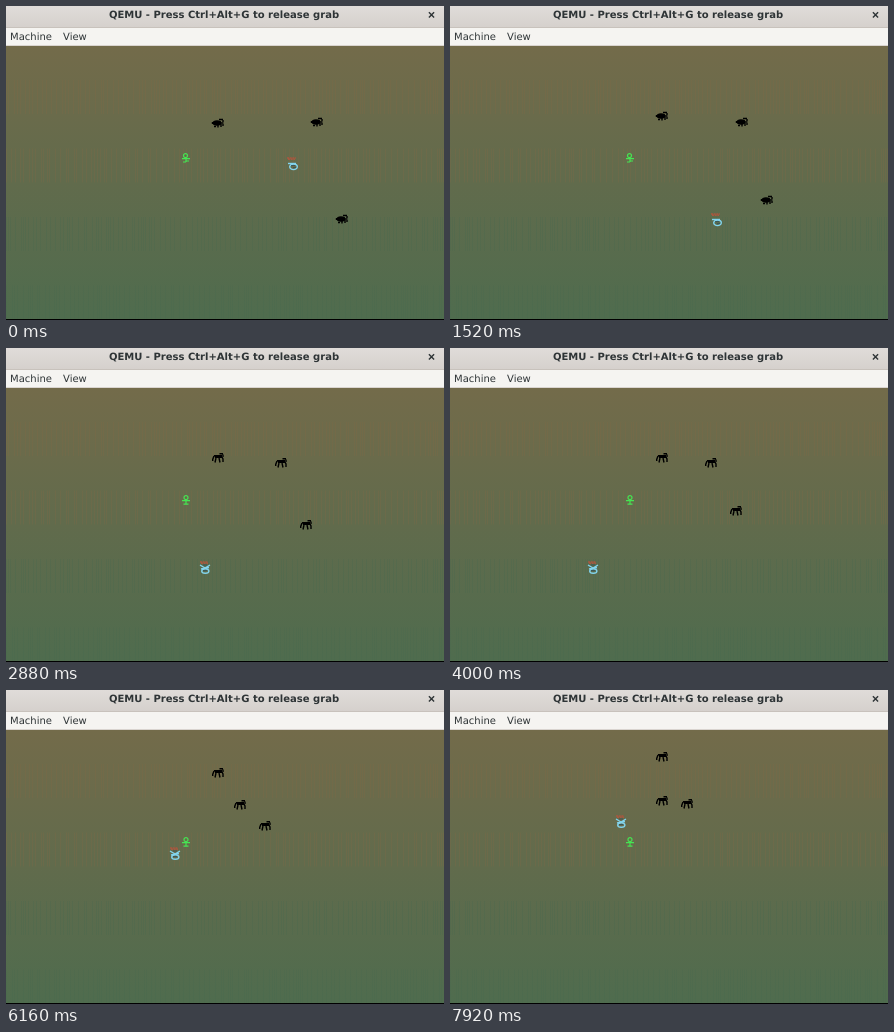
An HTML page that plays this animation: 438 by 314 pixels, repeating every 8000 ms.

```html
<!DOCTYPE html>
<html lang="en">
<head>
<meta charset="utf-8">
<title>QEMU</title>
<style>
  html, body { margin: 0; width: 100%; height: 100%; overflow: hidden; background: #000; }
  svg { display: block; width: 438px; height: 314px; }
  text { font: 10.03px "DejaVu Sans", sans-serif; fill: #2e3436; text-rendering: geometricPrecision; }
  .title { font-weight: bold; text-anchor: middle; }
  .line { fill: none; stroke-width: 1.4; }
  .spider { stroke: #000; }
  .plant { stroke: #45e552; stroke-width: 1.2; }
  .hat { stroke: #a8583f; stroke-dasharray: 2 .7; }
  .body { stroke: #82d4ee; }
  .dark { stroke: #34525a; stroke-width: .8; }
</style>
</head>
<body>
<svg viewBox="0 0 438 314" xmlns="http://www.w3.org/2000/svg">
  <defs>
    <linearGradient id="bar" x2="0" y2="1">
      <stop stop-color="#e0dcd9"/><stop offset="1" stop-color="#d5d0cc"/>
    </linearGradient>
    <linearGradient id="field" x2="0" y2="1">
      <stop stop-color="#736b4a"/><stop offset=".5" stop-color="#616b4c"/><stop offset="1" stop-color="#4f6c4e"/>
    </linearGradient>

    <g id="spider0" class="line spider">
      <ellipse cx="-1" rx="3.6" ry="2" fill="#000"/>
      <path d="M1 -3.5H5M2 -2V0M3 0H5.5M5 -3V-1M-5.5 -1V1M-4 3.5H-2M0 2V4.5M3 1V4M5 1V3"/>
    </g>
    <g id="spider1" class="line spider">
      <path d="M-4 -2.2H4M-3 -.8H4M1.5 -4.3H5M5 -3.5V-1M-4 -2L-5.3 1.5V3M-2 0L-3 4.5M1 0L2 4.5M4 -1L5 1V4"/>
    </g>
    <g id="plant0" class="line plant">
      <circle cx="-.5" cy="-2.3" r="2"/>
      <path d="M-4 .6H4M0 0V4M-3 4H0M0 3H3"/>
    </g>
    <g id="plant1" class="line plant">
      <circle cy="-2.3" r="2"/>
      <path d="M-4 .6H4M0 0V4M-2.5 4.2H2.5"/>
    </g>
    <g id="hero0" class="line">
      <path class="hat" d="M-6 -8H3M-5 -6.7H2"/>
      <path class="body" d="M-5 -2.5H3"/>
      <ellipse class="body" cx=".5" cy=".8" rx="3.8" ry="2.8"/>
      <path class="dark" d="M-2 -.5H2M0 1.5H3"/>
    </g>
    <g id="hero1" class="line">
      <path class="hat" d="M-5 -6H3M-4 -4.7H3"/>
      <path class="body" d="M-5 -3L0 0L5 -3M-4 1L4 -.5"/>
      <ellipse class="body" cx=".3" cy="3" rx="3.6" ry="2.3"/>
      <path class="dark" d="M-2 -3H2M-2 2.5H2"/>
    </g>
  </defs>

  <rect width="438" height="22" fill="url(#bar)"/>
  <rect y="21" width="438" height="1" fill="#c8c2bc"/>
  <rect y="22" width="438" height="18" fill="#f5f4f1"/>
  <rect y="39.3" width="438" height=".7" fill="#cdc7c2"/>
  <rect y="40" width="438" height="273" fill="url(#field)"/>
  <g id="weave"></g>
  <rect y="313" width="438" height="1"/>
  <text class="title" x="218" y="12.3">QEMU - Press Ctrl+Alt+G to release grab</text>
  <path d="M422.9 6.2L428.1 11.4M428.1 6.2L422.9 11.4" stroke="#2e3436" stroke-width="1.4"/>
  <text x="4" y="34.4">Machine</text>
  <text x="57" y="34.4">View</text>
  <g id="stage"></g>
</svg>
<script>
const STEP = 80, STEPS = 100;
const FLIP = 10.2, LEAD = 1.5;   // pose change, in steps
const STRIDE = 4;                // hero pixels per step

// Steps of [from, to] that have passed by step n.
const held = (n, from, to) => Math.max(0, Math.min(n, to) - from);

function hero(n) {
  const left = held(n, 0, 5) + held(n, 19, 57.5) + held(n, 80, 89);
  const right = held(n, 63, 77) + held(n, 89.5, STEPS);
  const down = held(n, 5, 20) + held(n, 77, 84);
  const up = held(n, 50, 64) + held(n, 84, STEPS);
  return [287 + STRIDE * (right - left), 160 + STRIDE * (down - up)];
}

const actors = [
  { kind: "spider", at: n => [212, 117 - held(n, 0, 7) - held(n, 50, 95) + held(n, 97, STEPS)] },
  { kind: "spider", at: n => [311 - n, 116 - held(n, 30, 31) - held(n, 95, STEPS)] },
  { kind: "spider", at: n => [336 - n, 213 - n] },
  { kind: "plant", at: () => [180, 152] },
  { kind: "hero", at: hero }
];

function add(parent, tag, attrs = {}) {
  const node = document.createElementNS(parent.namespaceURI, tag);
  for (const key in attrs) node.setAttribute(key, attrs[key]);
  parent.append(node);
  return node;
}

// Faint vertical threads in every second band of the field.
let seed = 7;
const random = () => (seed = seed * 16807 % 2147483647) / 2147483647;
const weave = document.getElementById("weave");
for (let band = 0; band < 4; band++) {
  let d = "";
  for (let x = 0; x < 438; x += 2 + Math.floor(random() * 5)) d += `M${x + .5} ${74 + band * 68.5}v34`;
  add(weave, "path", { d, stroke: band < 2 ? "#806a48" : "#496a50", "stroke-opacity": .3 });
}

const stage = document.getElementById("stage");
for (const a of actors) a.node = add(stage, "use");

function draw(now) {
  const n = Math.floor(now / STEP) % STEPS;
  const pose = Math.floor((n + LEAD) / FLIP) % 2;
  for (const { kind, at, node } of actors) {
    const [x, y] = at(n);
    node.setAttribute("href", `#${kind}${pose}`);
    node.setAttribute("transform", `translate(${x} ${y})`);
  }
}

const start = performance.now();
function tick() {
  draw(performance.now() - start);
  requestAnimationFrame(tick);
}
tick();
</script>
</body>
</html>
```
